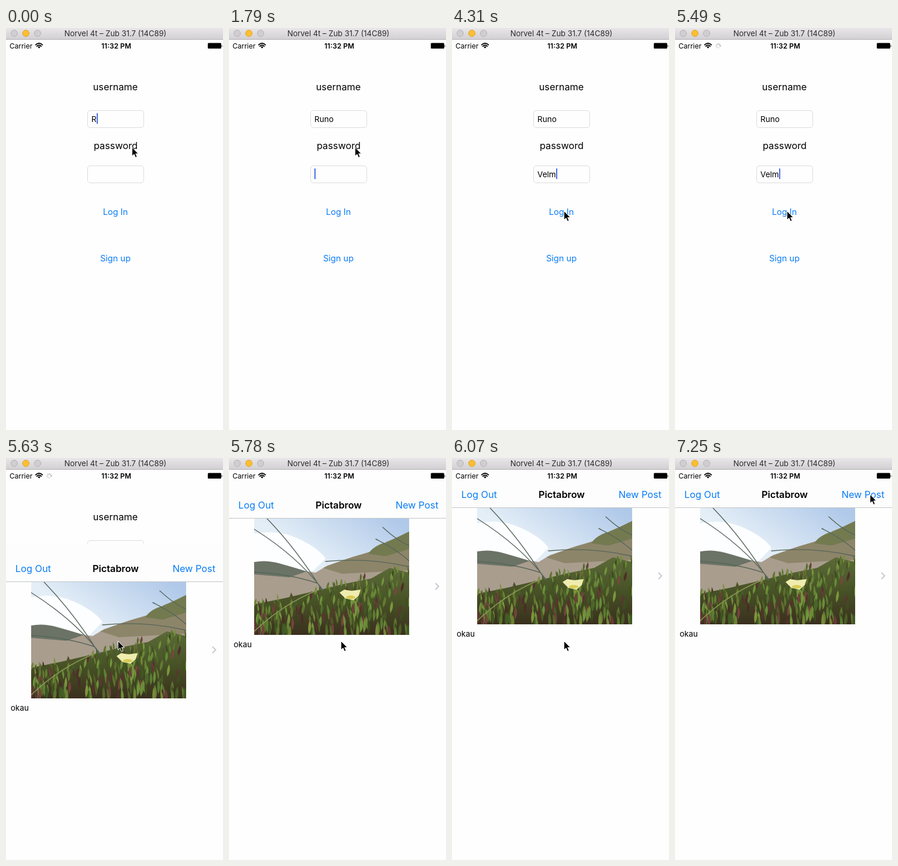
These frames come from a looping animation (371x684 px, 8 s). An HTML page:

```html
<!DOCTYPE html>
<html lang="en">
<head>
<meta charset="utf-8">
<title>Login demo</title>
<style>
html, body { margin: 0; width: 100%; height: 100%; overflow: hidden; background: #fefefe; }
svg { display: block; font-family: Inter, "Open Sans", sans-serif; }
.mid { text-anchor: middle; }
.link { fill: #0a7cf8; }
.bold { font-weight: 600; }
.field { fill: #fefefe; stroke: #dcdcdc; }
.line { fill: none; stroke-linecap: round; }
</style>
</head>
<body>
<svg width="371" height="684" viewBox="0 0 371 684">
  <defs>
    <linearGradient id="chrome" x2="0" y2="1">
      <stop stop-color="#e8e6e8"/><stop offset="1" stop-color="#d1cfd1"/>
    </linearGradient>
    <linearGradient id="sky" x1=".9" x2=".5" y2=".45">
      <stop stop-color="#b0c9e9"/><stop offset="1" stop-color="#e4eef7"/>
    </linearGradient>
    <linearGradient id="plants" x2="0" y2="1">
      <stop stop-color="#5c6a38"/><stop offset=".5" stop-color="#475226"/><stop offset="1" stop-color="#3a2f1e"/>
    </linearGradient>
    <clipPath id="frame"><path d="M0 0H265V198H0z"/></clipPath>
  </defs>

  <rect width="371" height="684" fill="#fefefe"/>

  <g id="login">
    <g class="mid" font-size="16.3">
      <text x="187" y="106">username</text>
      <text x="187.5" y="206">password</text>
    </g>
    <rect class="field" x="139.5" y="140.5" width="96" height="29" rx="4.5"/>
    <rect class="field" x="139.5" y="234.5" width="96" height="29" rx="4.5"/>
    <g font-size="13.5">
      <text id="user" x="146" y="160"></text>
      <text id="pass" x="146" y="254"></text>
    </g>
    <rect id="caret" width="2" height="18" fill="#4a6fe3"/>
    <g class="mid link" font-size="14.6">
      <text id="enter" x="187" y="318">Log In</text>
      <text x="187" y="397">Sign up</text>
    </g>
  </g>

  <g id="feed">
    <rect y="20" width="371" height="664" fill="#fdfefd"/>
    <rect y="20" width="371" height="64" fill="#fcfdfc"/>
    <path d="M0 84.5H371" stroke="#c4c6c8"/>
    <g font-size="16.3">
      <text class="link" x="16" y="68">Log Out</text>
      <text class="mid bold" x="187.5" y="68">Pictabrow</text>
      <text class="link" x="358" y="68" text-anchor="end">New Post</text>
    </g>
    <g transform="translate(43 85)" clip-path="url(#frame)">
      <rect width="265" height="198" fill="url(#sky)"/>
      <path d="M0 26Q40 18 75 34T122 68L100 90H0z" fill="#fdfeff"/>
      <path d="M0 88L60 86 105 92 125 80 190 60 265 28V198H0z" fill="#a99d8e"/>
      <path d="M0 74Q20 70 42 76T90 90L60 100 0 95z" fill="#6b7366"/>
      <path d="M118 84Q150 70 190 59T225 40L265 24V88L150 94z" fill="#8d8569"/>
      <path d="M195 60Q205 45 228 40L265 22V52L225 64z" fill="#737a50"/>
      <path d="M0 146L50 136 110 122 150 112 200 102 232 84 265 92V198H0z" fill="url(#plants)"/>
      <g id="leaves"></g>
      <g class="line" stroke="#56655a" stroke-width="1.4">
        <path d="M22 0Q75 55 116 122M0 18Q75 65 118 122M0 91Q60 94 108 110"/>
        <path d="M122 73Q195 66 265 82M208 35Q240 50 265 72M220 15Q245 38 265 46"/>
        <path d="M0 192Q50 145 108 122" stroke="#8b9955"/>
        <path d="M166 136Q180 145 172 166" stroke="#7d963f" stroke-width="3"/>
      </g>
      <path d="M146 126L154 121 166 123 182 121 179 131 170 139 156 136z" fill="#efecaf"/>
      <ellipse cx="165" cy="134" rx="8" ry="3" fill="#d8cb55"/>
    </g>
    <path d="M353 195L358.5 200.5 353 206" fill="none" stroke="#c7c7cc" stroke-width="1.8"/>
    <text x="8" y="304" font-size="13.5">okau</text>
  </g>

  <g id="status" font-size="12">
    <text x="6" y="34.5">Carrier</text>
    <path class="line" d="M50.7 28.6Q56.5 23.4 62.3 28.6M52.8 31Q56.5 27.6 60.2 31" stroke="#000" stroke-width="1.8"/>
    <path d="M54.3 32.2Q56.5 30.4 58.7 32.2L56.5 34.8z"/>
    <g id="spinner"></g>
    <text class="mid bold" x="188.5" y="34.5">11:32 PM</text>
    <rect x="345" y="25.5" width="23" height="9.5" rx="1.5"/>
    <path d="M368.7 28.5Q370.5 30.5 368.7 32.5z"/>
  </g>

  <g id="window">
    <rect width="371" height="20" fill="url(#chrome)"/>
    <path d="M0 19.5H371" stroke="#b5b3b5"/>
    <circle cx="14" cy="9" r="5.5" fill="#d0ced0" stroke="#b4b2b4"/>
    <circle cx="34" cy="9" r="5.5" fill="#fdbe30" stroke="#dfa32c"/>
    <circle cx="54" cy="9" r="5.5" fill="#d0ced0" stroke="#b4b2b4"/>
    <text class="mid" x="187" y="14" font-size="13" fill="#2c2b2c">Norvel 4t – Zub 31.7 (14C89)</text>
  </g>

  <path id="pointer" d="M0 0V15L3.5 11.8 6 17.4 8.6 16.3 6.2 10.9H10.8z" stroke="#fff" stroke-width="1"/>
</svg>

<script>
const $ = id => document.getElementById(id);
const LOOP = 8000;

// Each track lists [start time, value]; a value holds until the next one.
const user = [[0, "R"], [150, "Ru"], [750, "Runo"]];
const pass = [[0, ""], [1940, "V"], [2090, "Ve"], [2240, "Velm"]];
const caret = [[0, 1], [1340, .5], [1790, 1], [2690, .5], [2840, 0], [3130, 1],
  [3870, .5], [4020, 0], [4310, 1], [5050, .5], [5200, 0], [5480, 1]];
const pointer = [[0, [215.5, 203]], [2540, [215, 207]], [2690, [212, 222]], [2840, [206, 246]],
  [2990, [199, 274]], [3130, [194, 297]], [3270, [192, 308]], [3420, [191.5, 311.5]],
  [6660, [333, 74]], [6810, [340, 60]], [6960, [348, 50]], [7100, [342, 46]], [7250, [333.5, 62]]];
const slide = [[0, null], [5630, 126], [5780, 18], [5930, 2], [6070, 0]];

const at = (track, t) => track.findLast(([start]) => start <= t)[1];
const within = (t, from, to) => t >= from && t < to;
const show = (el, on) => el.setAttribute("display", on ? "inline" : "none");

$("spinner").innerHTML = Array.from({ length: 8 }, (_, i) =>
  `<path d="M0 -2.2V-4.6" stroke="#555" stroke-opacity="${.2 + i * .09}" transform="rotate(${i * 45})"/>`).join("");

let seed = 7;
const random = () => (seed = seed * 16807 % 2147483647) / 2147483647;

// Upright leaves, back rows first, redder towards the lower left.
function leaf(_, i, { length }) {
  const x = random() * 265, depth = i / length;
  const ridge = 150 - x * .24;
  const y = ridge + depth * (210 - ridge);
  const h = 14 + depth * 12, w = 2 + depth * 1.5, lean = random() * 8 - 4;
  const red = random() < .15 + .3 * depth * (1 - x / 265);
  const color = red ? `hsl(8 32% ${22 + random() * 14}%)` : `hsl(${74 + random() * 14} 42% ${20 + random() * 22}%)`;
  return `<path d="M${x} ${y}q${-w} ${-h / 2} ${lean} ${-h}q${w * 2 - lean / 2} ${h / 2} ${-lean} ${h}z" fill="${color}"/>`;
}
$("leaves").innerHTML = Array.from({ length: 260 }).map(leaf).join("");

function draw(now) {
  const t = now % LOOP;
  $("user").textContent = at(user, t);
  $("pass").textContent = at(pass, t);

  const inPass = t >= 1340;
  const width = $(inPass ? "pass" : "user").getComputedTextLength();
  $("caret").setAttribute("x", 146 + Math.round(width));
  $("caret").setAttribute("y", inPass ? 239 : 145);
  $("caret").setAttribute("opacity", at(caret, t));
  $("enter").setAttribute("opacity", within(t, 4900, 5050) ? .3 : 1);

  show($("spinner"), within(t, 5050, 5780));
  const turn = Math.floor((t - 5050) / 147) * 45;
  $("spinner").setAttribute("transform", `translate(74 30.5) rotate(${turn})`);

  const y = at(slide, t);
  show($("feed"), y !== null);
  $("feed").setAttribute("transform", `translate(0 ${y ?? 0})`);
  $("pointer").setAttribute("transform", `translate(${at(pointer, t)})`);
}

const start = performance.now();
function tick() {
  draw(performance.now() - start);
  requestAnimationFrame(tick);
}
tick();
</script>
</body>
</html>
```
